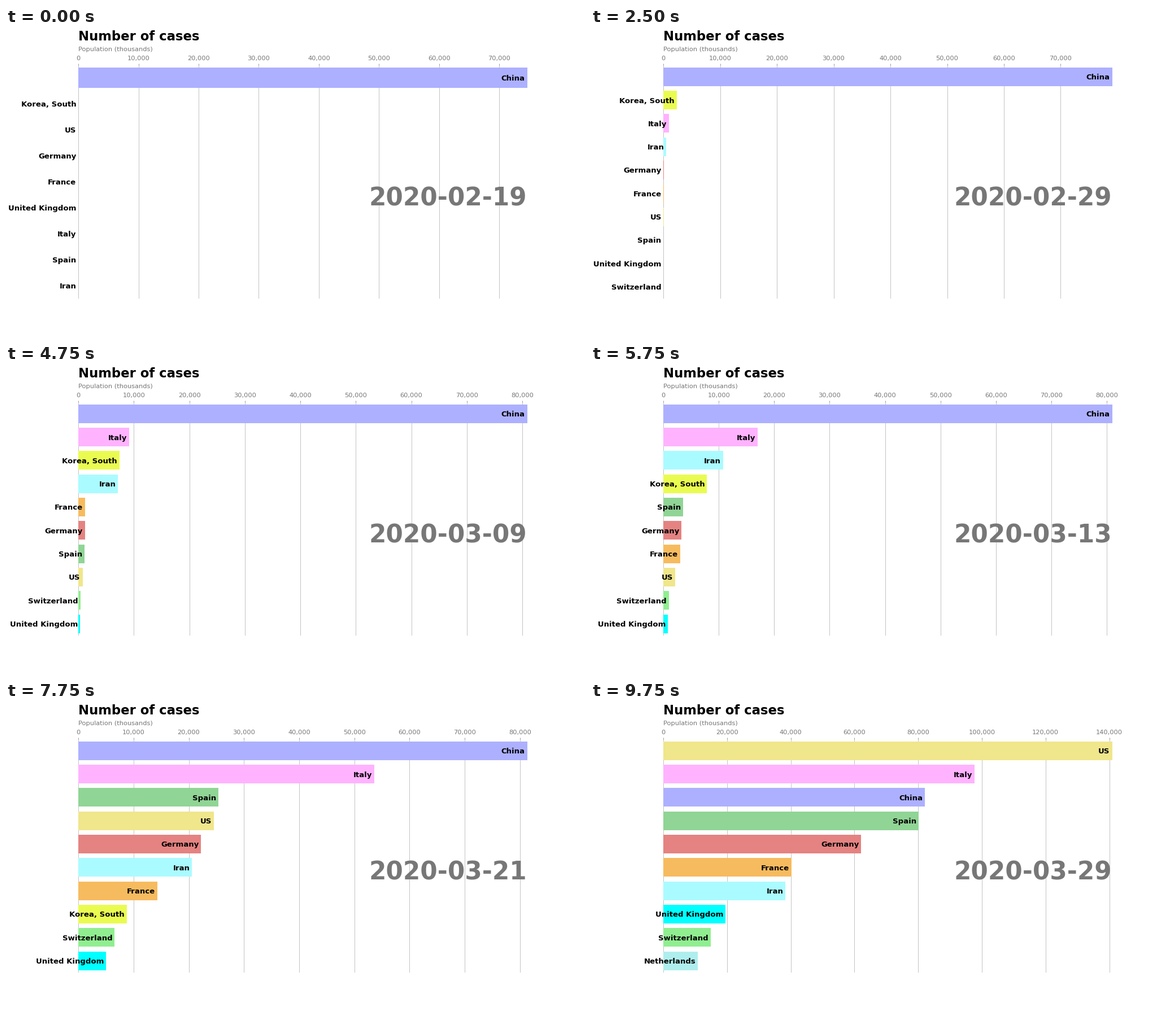
Animation, 1025 px wide and 547 px high, one loop 10 s. Source, as a matplotlib script:

```python
import numpy as np
import matplotlib.pyplot as plt
from matplotlib.animation import FuncAnimation

WIDTH, HEIGHT, DPI = 1025, 547, 64
UNIT = WIDTH / 15 / DPI  # sizes are laid out for a figure 15 inches wide
DAYS = 40
TOP = 10
GREY = "#777777"

# Cases grow exponentially between these days.
KEY_DAYS = (0, 6, 14, 19, 27, 31, 36, 39)
COUNTRIES = {
    "China": ("#adb0ff", 74619, 77754, 80386, 80860, 81058, 81305, 81782, 82122),
    "Korea, South": ("#eafb50", 31, 977, 5621, 7420, 8320, 8799, 9241, 9583),
    "US": ("#f0e68c", 17, 20, 140, 760, 5921, 24550, 83836, 140886),
    "Germany": ("#e48381", 16, 17, 262, 1176, 9257, 22213, 43938, 62095),
    "France": ("#f7bb5f", 12, 14, 285, 1209, 7652, 14282, 29155, 40174),
    "United Kingdom": ("#00ffff", 9, 13, 85, 321, 1950, 5018, 11658, 19522),
    "Italy": ("#ffb3ff", 3, 322, 3089, 9172, 31506, 53578, 80589, 97689),
    "Spain": ("#90d595", 2, 6, 222, 1073, 11748, 25374, 57786, 80110),
    "Iran": ("#aafbff", 2, 95, 2922, 7161, 16169, 20610, 29406, 38309),
    "Austria": ("#c0c0c0", 0.02, 2, 29, 131, 1332, 2814, 6909, 8788),
    "Switzerland": ("#90ee90", 0.02, 1.6, 90, 374, 2700, 6575, 11811, 14829),
    "Netherlands": ("#afeeee", 0.02, 0.3, 38, 265, 1705, 3631, 7431, 10866),
}

plt.rcParams["font.family"] = "DejaVu Sans"
fig, ax = plt.subplots(figsize=(WIDTH / DPI, HEIGHT / DPI), dpi=DPI)
fig.subplots_adjust(left=0.125, right=0.9, top=0.88, bottom=0.125)


def ranking(day):
    """The leading countries of a day as (name, colour, cases), largest first."""
    rows = []
    for name, (colour, *counts) in COUNTRIES.items():
        cases = np.exp(np.interp(day, KEY_DAYS, np.log(counts)))
        if cases >= 1:
            rows.append((name, colour, cases))
    return sorted(rows, key=lambda row: -row[2])[:TOP]


def date_text(day):
    month, date = (2, 19 + day) if day <= 10 else (3, day - 10)
    return f"2020-{month:02d}-{date:02d}"


def caption(x, y, text, size, **style):
    ax.text(x, y, text, transform=ax.transAxes, size=size * UNIT, **style)


def style_axes():
    ax.xaxis.set_major_formatter("{x:,.0f}")
    ax.xaxis.set_ticks_position("top")
    ax.tick_params(axis="x", colors=GREY, labelsize=12 * UNIT,
                   length=3.5 * UNIT, pad=3.5 * UNIT, width=0.8 * UNIT)
    ax.set_yticks([])
    ax.margins(0, 0.01)
    ax.grid(axis="x", linestyle="-", color="#b0b0b0", linewidth=0.8 * UNIT)
    ax.set_axisbelow(True)
    ax.set_frame_on(False)


def draw(day):
    ax.clear()
    names, colours, cases = zip(*ranking(day))
    rows = range(len(names) - 1, -1, -1)
    ax.barh(rows, cases, color=colours)
    gap = cases[0] / 200
    for row, name, value in zip(rows, names, cases):
        ax.text(value - gap, row, name, size=14 * UNIT, weight="bold",
                ha="right", va="center_baseline")
    style_axes()
    caption(1, 0.398, date_text(day), 46, color=GREY, weight="bold", ha="right")
    caption(0, 1.06, "Population (thousands)", 12, color=GREY)
    caption(0, 1.105, "Number of cases", 24, weight="bold")
    return []


anim = FuncAnimation(fig, draw, frames=DAYS, interval=250,
                     init_func=lambda: draw(0), repeat=True, repeat_delay=0)
plt.show()
```
